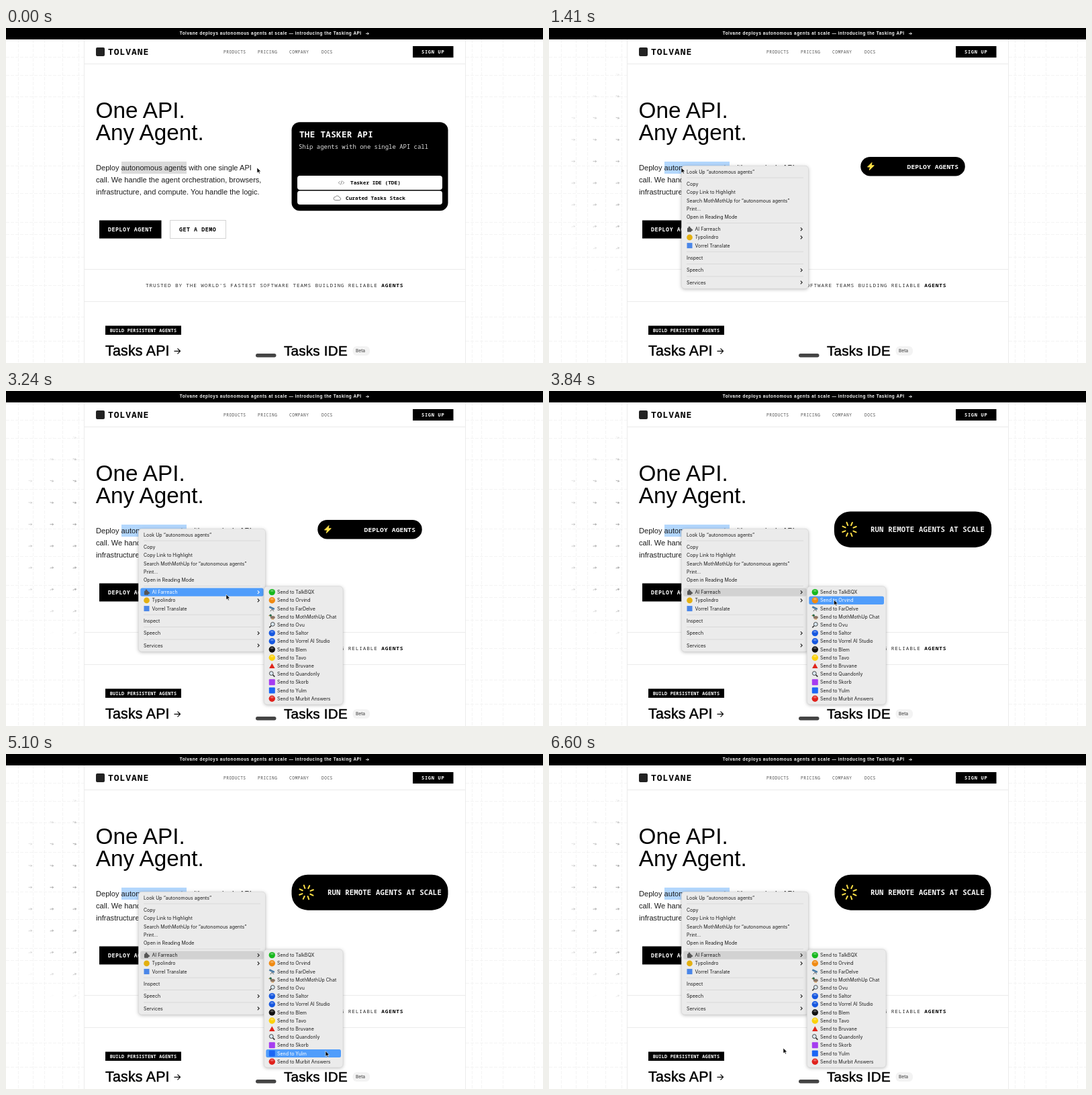
An HTML page that plays this animation: 800x499 px, repeating every 6.63 s.

```html
<!DOCTYPE html>
<html lang="en">
<head>
<meta charset="utf-8">
<title>Agent landing page</title>
<style>
html, body { margin: 0; width: 100%; height: 100%; overflow: hidden; background: #fff; }
svg { display: block; width: 100%; height: 100%; }
text { white-space: pre; }
.sans { font-family: "Liberation Sans", Arial, sans-serif; }
.mono { font-family: "Noto Sans Mono", "DejaVu Sans Mono", monospace; }
.ui { font-family: Inter, Roboto, sans-serif; }
.menu > rect:first-child { filter: drop-shadow(0 1.5px 2.5px rgba(0,0,0,.25)); }
</style>
</head>
<body>
<svg id="stage" viewBox="0 0 800 499"></svg>
<script>
const LOOP = 6630, ROW = 12.2, BLUE = '#509dfb';
const stage = document.getElementById('stage');
const $ = id => document.getElementById(id);
const clamp = (v, a = 0, b = 1) => Math.min(b, Math.max(a, v));
const ramp = (t, a, b) => clamp((t - a) / (b - a));

const text = (cls, x, y, s, size, attrs = '') =>
  `<text class="${cls}" x="${x}" y="${y}" font-size="${size}" ${attrs}>${s}</text>`;
const sans = (...a) => text('sans', ...a);
const mono = (...a) => text('mono', ...a);
const ui = (...a) => text('ui', ...a);
const rect = (x, y, w, h, fill, r = 0, attrs = '') =>
  `<rect x="${x}" y="${y}" width="${w}" height="${h}" fill="${fill}" rx="${r}" ${attrs}/>`;
const path = (d, stroke, w = 1, attrs = '') =>
  `<path d="${d}" fill="none" stroke="${stroke}" stroke-width="${w}" ${attrs}/>`;
const spaced = (n, weight = 400, fill = '#000') =>
  `letter-spacing="${n}" font-weight="${weight}" fill="${fill}"`;

// Faint dashed blueprint lines in both margins
function backdrop() {
  const xs = [18, 40, 57, 84, 108, 694, 708, 740, 787];
  const ys = [43, 70, 102, 146, 205, 246, 289, 307, 341, 383, 430, 466];
  const d = xs.map(x => `M${x}.5 17V499`).join('') +
    ys.map(y => `M0 ${y}.5H116M685 ${y}.5H800`).join('');
  return path(d, '#f1f1f1', 0.8, 'stroke-dasharray="5 2"') +
    path('M116.5 17V499M684.5 17V499M116.5 53.5H684.5M116.5 359.5H684.5M116.5 407.5H684.5', '#ebebeb');
}

// Small arrows leaning toward the hover position
function arrows() {
  let out = '';
  for (let r = 0; r < 10; r++) for (const x of [36, 68, 102]) {
    const y = 69 + r * 32.4;
    const fade = clamp(2 * (1 - Math.hypot(160 - x, 215 - y) / 175));
    const turn = Math.atan2(208 - y, 197 - x) * 0.4 * 180 / Math.PI;
    out += path('M-2.5 0H2.5M.7 -1.5L2.7 0L.7 1.5', '#999', 0.8,
      `transform="translate(${x} ${y}) rotate(${turn})" opacity="${fade}"`);
  }
  return `<g id="arrows">${out}</g>`;
}

function page() {
  const nav = [[324, 'PRODUCTS'], [375, 'PRICING'], [422, 'COMPANY'], [470, 'DOCS']];
  const body = [[212, 'Deploy autonomous agents with one single API'],
    [230, 'call. We handle the agent orchestration, browsers,'],
    [248, 'infrastructure, and compute. You handle the logic.']];
  const medium = 'stroke="#000" stroke-width=".5" letter-spacing=".25"';
  return rect(0, 0, 800, 17, '#000') +
    sans(258.7, 10.4, 'Tolvane deploys autonomous agents at scale — introducing the Tasking API', 6.4,
      spaced(.55, 700, '#fff')) +
    path('M536 8.3H540.3M538.5 6.5L540.3 8.3L538.5 10.1', '#fff', .9) +
    rect(134, 29, 13, 13, '#222', 2) +
    mono(152, 40, 'TOLVANE', 13, spaced(.95, 700)) +
    nav.map(([x, s]) => mono(x, 38, s, 6.2, spaced(.48, 400, '#555'))).join('') +
    rect(606, 27, 60.5, 17, '#000') +
    mono(619, 37.8, 'SIGN UP', 7, spaced(.7, 700, '#fff')) +
    sans(133.5, 133.6, 'One API.', 33.3) + sans(133.8, 167, 'Any Agent.', 33.3) +
    rect(172, 199, 97, 18, '#ddd', 0, 'id="mark"') +
    body.map(([y, s]) => sans(134, y, s, 11.1, 'fill="#1c1c1c"')).join('') +
    rect(139, 286.5, 92.5, 27, '#000') +
    mono(152, 303, 'DEPLOY AGENT', 8.3, spaced(.55, 600, '#fff')) +
    rect(244.5, 286.5, 83, 27, '#fff', 0, 'stroke="#d4d4d4"') +
    mono(258, 303, 'GET A DEMO', 8.3, spaced(.55, 600)) +
    mono(208, 386.3, `TRUSTED BY THE WORLD'S FASTEST SOFTWARE TEAMS BUILDING RELIABLE <tspan font-weight="700" fill="#000">AGENTS</tspan>`,
      7.8, spaced(.81, 400, '#333')) +
    rect(148, 443.5, 113, 13.5, '#000') +
    mono(154.7, 452.7, 'BUILD PERSISTENT AGENTS', 6.8, spaced(.25, 700, '#fff')) +
    sans(148, 488, 'Tasks API', 21.3, medium) + sans(414, 488, 'Tasks IDE', 20.6, medium) +
    path('M250.5 481.3H259.5M255.5 477.3L259.5 481.3L255.5 485.3', '#000', 1.2) +
    rect(516.5, 474, 25.5, 14, '#f3f3f3', 6) + ui(521, 483.2, 'Beta', 6.6, 'fill="#333"');
}

function card() {
  let spokes = '';
  for (let a = 0; a < 360; a += 45) spokes += `<path d="M6.4 0H11" transform="rotate(${a})"/>`;
  return `<clipPath id="cut">${rect(0, 0, 0, 0, '#000', 0, 'id="cutBox"')}</clipPath>` +
    rect(0, 0, 0, 0, '#000', 0, 'id="card"') +
    `<g clip-path="url(#cut)"><g id="intro">` +
    mono(437, 163, 'THE TASKER API', 12.5, spaced(.36, 600, '#fff')) +
    mono(436, 180, 'Ship agents with one single API call', 8.95, 'fill="#ddd"') +
    rect(434, 220, 216, 21, '#fff', 4) + rect(434, 242.5, 216, 20.5, '#fff', 4) +
    path('M497.5 228.3L495.3 230.5L497.5 232.7M501.5 228.3L503.7 230.5L501.5 232.7M500.3 227.5L498.7 233.5', '#555', .7) +
    path('M490.5 256.5a2.5 2.5 0 0 1 .3 -5a3.3 3.3 0 0 1 6 1a2 2 0 0 1 -.3 4z', '#555', .7) +
    mono(513, 233.2, 'Tasker IDE (TDE)', 7.8, spaced(0, 600)) +
    mono(506, 255.5, 'Curated Tasks Stack', 7.8, spaced(0, 600)) +
    `</g><g id="deploy"><path d="M481 200.5L474.5 207H478.6L477.3 211.5L484.3 204.8H480.2Z" fill="#fde047" stroke="#fde047" stroke-linejoin="round"/>` +
    mono(533.5, 209.7, 'DEPLOY AGENTS', 9.6, spaced(.14, 700, '#fff')) +
    `</g><g id="run"><g id="spin" stroke="#fde047" stroke-width="2" stroke-linecap="round">${spokes}</g>` +
    mono(479, 210, 'RUN REMOTE AGENTS AT SCALE', 10.6, spaced(.18, 600, '#fff') + ' id="runText"') + `</g></g>`;
}

// Icons are drawn around 0,0
const ball = c => `<circle r="4.7" fill="${c}"/><ellipse cy="-2" rx="2.6" ry="1.6" fill="#fff" opacity=".3"/>`;
const square = c => rect(-4.5, -4.5, 9, 9, c, 1);
const lens = `<circle cx="-1" cy="-1" r="2.9" fill="#d9e8f2" stroke="#444"/>` + path('M1.3 1.3L4 4', '#333', 1.6);
const lensFlipped = `<g transform="scale(-1 1)">${lens}</g>`;
const scope = path('M-4 -2.5L3.5 1', '#4d7ea8', 2.8) + path('M0 1L-2.5 4.2M0 1L2.5 4.2', '#555', .9);
const bird = `<ellipse cx="1" cy="1" rx="3.5" ry="2.2" fill="#8b7565"/><circle cx="-2.2" cy="-2" r="1.8" fill="#2f6b4a"/>` +
  path('M-4 -1.6H-5M0 3V4.5M2 3V4.5', '#e08a1e', 1);
const puzzle = rect(-3.5, -2, 6, 6, '#555', .8) + '<circle cx="-.5" cy="-2.6" r="1.5" fill="#555"/><circle cx="3" cy="1" r="1.5" fill="#555"/>';

const mainRows = [
  [214, 'Look Up “autonomous agents”'], [232.4, 'Copy'], [244.7, 'Copy Link to Highlight'],
  [257, 'Search MothMothUp for “autonomous agents”'], [269.1, 'Print…'], [281.3, 'Open in Reading Mode'],
  [299.7, 'AI Farreach', puzzle, 1], [311.9, 'Typolindro', '<circle r="4.3" fill="#e3b011"/>', 1],
  [324.1, 'Vorrel Translate', rect(-4, -4, 8, 8, '#4a86e8')],
  [342.4, 'Inspect'], [360.7, 'Speech', '', 1], [379, 'Services', '', 1]
];
const PARENT = 6;
const subRows = [
  ['TalkBQX', ball('#16b81d')], ['Orvind', ball('#f08a12')], ['FarDelve', scope],
  ['MothMothUp Chat', bird], ['Ovu', lensFlipped], ['Saltor', ball('#1557e0')],
  ['Vorrel AI Studio', ball('#1557e0')], ['Blem', ball('#111')], ['Tavo', ball('#fbd20a')],
  ['Bruvane', '<path d="M0 -4L4.2 3.6H-4.2Z" fill="#e0251b"/>'], ['Quandorily', lens],
  ['Skorb', square('#a63cf0')], ['Yulm', square('#1b66f5')], ['Murbit Answers', ball('#e0201b')]
].map(([s, icon], i) => [299.6 + i * ROW, 'Send to ' + s, icon]);

function menu(id, x, y, w, h, rows, seps) {
  const items = rows.map(([cy, s, icon, more], i) => {
    const isSub = id === 'sub';
    const tx = isSub ? 404 : icon ? 217.5 : 205;
    return `<g id="${id}${i}" color="#1d1d1d">` +
      rect(x + 3, cy - 6.1, w - 6, ROW, 'none', 2.5) +
      (icon ? `<g transform="translate(${isSub ? 396.3 : 209.5} ${cy})">${icon}</g>` : '') +
      ui(tx, cy + 2.5, s, 7, 'fill="currentColor"') +
      (more ? path(`M374.8 ${cy - 2.4}L377.2 ${cy}L374.8 ${cy + 2.4}`, 'currentColor', 1.1) : '') + '</g>';
  }).join('');
  return `<g id="${id}" class="menu">` + rect(x, y, w, h, '#ebebeb', 5, 'stroke="#cecece" stroke-width=".5"') +
    path(seps.map(v => `M205 ${v}H379`).join(''), '#d2d2d2', .7) + items + '</g>';
}

stage.innerHTML = rect(0, 0, 800, 499, '#fff') + backdrop() + arrows() + page() + card() +
  rect(372, 485, 30.5, 5.5, '#444', 2.7) +
  menu('main', 197.3, 205.3, 189.2, 183, mainRows, [223, 290.5, 333.2, 351.5, 370]) +
  menu('sub', 384.3, 291, 117.7, 176, subRows, []) +
  `<path id="arrow" d="M0 0V8L1.9 6.3L3.1 9L4.4 8.4L3.2 5.8H5.7Z" stroke="#fff" stroke-width=".6"/>` +
  path('M-1.5 -4.5Q0 -4.5 0 -3.5Q0 -4.5 1.5 -4.5M0 -3.5V3.5M-1.5 4.5Q0 4.5 0 3.5Q0 4.5 1.5 4.5', '#222', .8, 'id="beam"');

// Cursor track: time, x, y
const track = [
  [0, 374, 208], [90, 374, 208], [600, 174.5, 208], [720, 174.5, 208], [1260, 197, 208], [2220, 197, 208],
  [2640, 305, 301], [3200, 328, 303], [3390, 328, 303], [3700, 395, 303], [4100, 464, 345],
  [4440, 473, 393], [4800, 476, 425], [5500, 476, 455], [5790, 476, 455], [6560, 349, 438], [6630, 349, 438]
];
const slope = (i, k) => (track[i + 1][k] - track[i][k]) / (track[i + 1][0] - track[i][0]);
function tangent(i, k) {
  if (i === 0 || i === track.length - 1) return 0;
  const a = slope(i - 1, k), b = slope(i, k);
  return a * b <= 0 ? 0 : 2 * a * b / (a + b);
}
function cursorAt(t) {
  let i = 0;
  while (i < track.length - 2 && t >= track[i + 1][0]) i++;
  const span = track[i + 1][0] - track[i][0], u = clamp((t - track[i][0]) / span), v = 1 - u;
  return [1, 2].map(k =>
    track[i][k] * v * v * (1 + 2 * u) + track[i + 1][k] * u * u * (3 - 2 * u) +
    span * u * v * (tangent(i, k) * v - tangent(i + 1, k) * u));
}

function spring(t) {
  if (t < 0) return 0;
  const k = .0065, w = Math.PI / 540;
  return 1 - Math.exp(-k * t) * (Math.cos(w * t) + k / w * Math.sin(w * t));
}

const set = (id, attrs) => { for (const k in attrs) $(id).setAttribute(k, attrs[k]); };
const show = (id, on) => set(id, { display: on ? 'inline' : 'none' });

function paint(id, rows, active, held) {
  rows.forEach((_, i) => {
    const row = $(id + i);
    row.setAttribute('color', i === active ? '#fff' : '#1d1d1d');
    row.firstChild.setAttribute('fill', i === active ? BLUE : i === held ? '#d2d2d2' : 'none');
  });
}

function render(t) {
  const shrink = spring(t - 120), grow = spring(t - 3390);
  const w = 233 - 77.5 * shrink + 77.5 * grow;
  const h = 132 - 103.5 * shrink + 24.5 * grow;
  const r = Math.min(h / 2, 12 + 12 * clamp(shrink));
  const box = { x: 542 - w / 2, y: 206.2 - h / 2, width: w, height: h, rx: r };
  set('card', box);
  set('cutBox', box);
  set('intro', { opacity: 1 - ramp(t, 120, 300) });
  set('deploy', { opacity: Math.min(ramp(t, 330, 520), 1 - ramp(t, 3390, 3540)) });
  set('run', { opacity: ramp(t, 3560, 3800) });
  set('spin', { transform: `translate(447.5 206) rotate(${(t - 4460) * .18})` });
  set('runText', { opacity: .77 + .23 * Math.cos((t - 6683) / 1500 * 2 * Math.PI) });

  set('mark', { fill: t < 600 ? '#dadada' : '#b3d7fd' });
  set('arrows', { opacity: ramp(t, 900, 1560) });

  const menuOpen = t >= 1410, subOpen = t >= 2640;
  show('main', menuOpen);
  show('sub', subOpen);
  const [hx, hy] = cursorAt(t - 30);
  const hit = rows => rows.findIndex(row => Math.abs(hy - row[0]) <= ROW / 2);
  const inSub = subOpen && hx >= 384 && hx <= 502;
  const overMain = menuOpen && !inSub && hx >= 200 && hx < 384 ? hit(mainRows) : -1;
  paint('main', mainRows, overMain, subOpen ? PARENT : -1);
  paint('sub', subRows, inSub ? hit(subRows) : -1, -1);

  const [x, y] = cursorAt(t);
  const overText = !menuOpen && x < 367;
  show('beam', overText);
  show('arrow', !overText);
  for (const id of ['beam', 'arrow']) set(id, { transform: `translate(${x} ${y})` });
}

const start = performance.now();
function tick() {
  render((performance.now() - start) % LOOP);
  requestAnimationFrame(tick);
}
tick();
</script>
</body>
</html>
```
